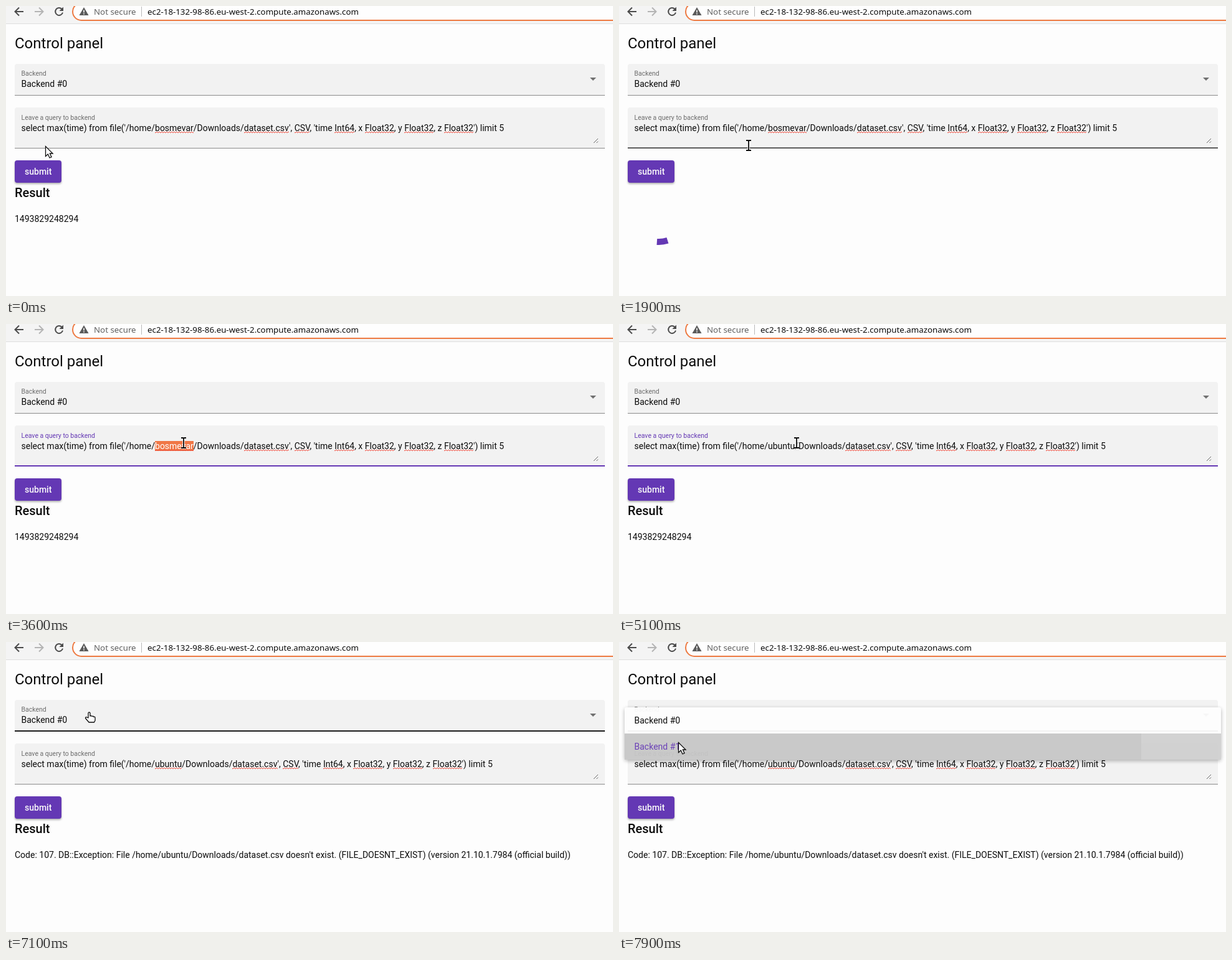
An HTML page that plays this animation: 974x466 px, repeating every 8 s.

```html
<!DOCTYPE html>
<html lang="en">
<head>
<meta charset="utf-8">
<title>Control panel</title>
<style>
  html, body { margin: 0; width: 100%; height: 100%; overflow: hidden; background: #fdfdfd; }
  svg { display: block; }
  text, .query { font: 14px Roboto, sans-serif; fill: #0c0c0c; color: #0c0c0c; white-space: pre; }
  .query { line-height: 16px; }
  .url { font: 13.3px "Noto Sans", sans-serif; }
  .title { font-size: 24px; }
  .label { font-size: 10.5px; fill: #6c6c6c; }
  .strong { font-weight: 500; }
  .field { fill: #f2f2f2; }
  .line { fill: #8a8a8a; }
  .icon { fill: none; stroke: #4a4a4a; stroke-width: 2; }
  .typo {
    background:
      repeating-linear-gradient(90deg, #ee4a3c 0 2px, transparent 2px 4px) 0 100% / 100% 1px no-repeat,
      repeating-linear-gradient(90deg, transparent 0 2px, #ee4a3c 2px 4px) 0 calc(100% - 1px) / 100% 1px no-repeat;
  }
  .selected { background-color: #f07746; color: #fff; }
  #button { fill: #6438b4; filter: drop-shadow(0 2px 1.5px rgba(0, 0, 0, .3)); }
  #button.pressed { filter: drop-shadow(0 4px 4px rgba(0, 0, 0, .35)); }
  #sheet { fill: #fefefe; filter: drop-shadow(0 2px 3px rgba(0, 0, 0, .3)); }
</style>
</head>
<body>
<svg width="974" height="466" viewBox="0 0 974 466">
  <rect width="974" height="28" fill="#f4f4f4"/>
  <rect y="28" width="974" height="1" fill="#dedede"/>
  <rect x="107" y="-5" width="920" height="28" rx="14" fill="#fefefe" stroke="#ee7a42" stroke-width="2"/>
  <path class="icon" d="M28 9H15M21 2.5L14.5 9L21 15.5"/>
  <path class="icon" style="stroke:#b4b4b4" d="M46 9H59M53 2.5L59.5 9L53 15.5"/>
  <path class="icon" d="M89.5 4.7A6 6 0 1 0 91 10.5"/>
  <path fill="#4a4a4a" d="M92 1.5V8H85.5z"/>
  <path fill="#5a5a5a" d="M125 2L132.5 15H117.500z"/>
  <path stroke="#fefefe" stroke-width="1.6" d="M125 6.500V10.500M125 11.800V13.400"/>
  <text class="url" x="141" y="13.500" style="fill:#606060">Not secure</text>
  <rect x="217" y="1" width="1" height="16" fill="#b9b9b9"/>
  <text class="url" x="227" y="13.500">ec2-18-132-98-86.eu-west-2.compute.amazonaws.com</text>

  <text class="title" x="14" y="68">Control panel</text>

  <path class="field" d="M14 143V97q0-4 4-4H957q4 0 4 4V143z"/>
  <rect class="line" x="14" y="143" width="947" height="1"/>
  <rect id="selectLine" x="14" y="142" width="947" height="2" fill="#1c1c1c"/>
  <text class="label" x="24.500" y="112">Backend</text>
  <text x="24.500" y="130">Backend #0</text>
  <path fill="#707070" d="M937 115H947L942 120z"/>

  <path class="field" d="M14 228V167q0-4 4-4H957q4 0 4 4V228z"/>
  <rect class="line" x="14" y="228" width="947" height="1"/>
  <rect id="queryLine" x="14" y="227" width="947" height="2"/>
  <text id="queryLabel" class="label" x="24.500" y="183">Leave a query to backend</text>
  <foreignObject x="24.500" y="188" width="920" height="18">
    <div class="query">select max(time) from file('/home/<span id="user"></span>/Downloads/<span class="typo">dataset.csv</span>', <span class="typo">CSV</span>, 'time <span class="typo">Int64</span>, x <span class="typo">Float32</span>, y <span class="typo">Float32</span>, z <span class="typo">Float32</span>') limit 5</div>
  </foreignObject>
  <path stroke="#666" d="M943 220L950 213M947.500 220L950 217.500"/>

  <rect id="button" x="14" y="248" width="75" height="36" rx="4"/>
  <text class="strong" x="30" y="271" style="fill:#fafafa">submit</text>

  <g id="result">
    <text class="strong" x="14" y="307" style="font-size:20px">Result</text>
    <text id="output" x="14" y="347"></text>
  </g>
  <circle id="spinner" cx="64" cy="334" r="45" pathLength="100" fill="none" stroke="#6438b4" stroke-width="10"/>

  <g id="menu">
    <rect id="sheet" x="9" y="105" width="957" height="84" rx="3"/>
    <rect id="hover" x="9" y="147" width="957" height="42" fill="#d0d0d0"/>
    <rect id="ripple" x="9" y="147" height="42" fill="#000" opacity=".045"/>
    <text id="option0" x="24.500" y="131">Backend #0</text>
    <text id="option1" x="24.500" y="173">Backend #1</text>
  </g>

  <g id="pointer">
    <path id="arrow" fill="#fefefe" stroke="#0a0a0a" stroke-width="1.300" d="M.5 .5V16.500L4.300 13L7 19L10 17.700L7.400 12H12z"/>
    <g id="beam" fill="none">
      <path stroke="#fefefe" stroke-width="3.500" d="M-4 -8H4M-4 8H4M0 -8V8"/>
      <path stroke="#0a0a0a" stroke-width="1.800" d="M-4 -8H-1L0 -7L1 -8H4M-4 8H-1L0 7L1 8H4M0 -7V7"/>
    </g>
    <path id="hand" fill="#fefefe" stroke="#0a0a0a" stroke-width="1.300" stroke-linejoin="round"
      d="M-2 9V1.500Q-2 0 -.5 0T1 1.500V6Q3 4.800 4 6.500Q6 5.500 6.500 7.300Q9 6.500 9 9V13L7.500 16H-1L-6.500 9.500Q-6.500 7 -4 8z"/>
  </g>
</svg>
<script>
const el = Object.fromEntries([...document.querySelectorAll('[id]')].map(e => [e.id, e]));
const LOOP = 8000, STEP = 100;
const PURPLE = '#6438b4', DARK = '#0c0c0c';

// time, x, y, shape shown from that time on
const path = [
  [0, 63, 225, 'arrow'], [300, 68, 243, 'arrow'], [700, 81, 264, 'arrow'], [900, 83, 267, 'arrow'],
  [1400, 83, 267, 'arrow'], [1800, 180, 222, 'beam'], [2000, 235, 226, 'beam'], [2100, 255, 236, 'arrow'],
  [2500, 299, 277, 'arrow'], [2700, 298, 275, 'arrow'], [2900, 289, 222, 'beam'], [3200, 283, 191, 'beam'],
  [3500, 284, 192, 'beam'], [3600, 285, 191, 'beam'], [5100, 285, 191, 'beam'], [5400, 170, 228, 'arrow'],
  [5700, 74, 265, 'arrow'], [6100, 74, 266, 'arrow'], [6500, 100, 222, 'beam'], [6800, 125, 193, 'beam'],
  [6900, 130, 140, 'hand'], [7100, 134, 113, 'hand'], [7400, 126, 118, 'hand'], [7600, 112, 138, 'arrow'],
  [7800, 96, 160, 'arrow'], [7900, 95, 161, 'arrow'], [LOOP, 95, 161, 'arrow']
];
const typed = [[0, 'bosmevar'], [4000, 'u'], [4100, 'ub'], [4200, 'ubu'], [4400, 'ubunt'], [4600, 'ubuntu']];

const within = (t, from, to) => t >= from && t < to;
const fade = (t, from, to) => within(t, from, to) ? Math.min(1, (t - from + 50) / 250) : 0;
const show = (e, on) => { e.style.display = on ? '' : 'none'; };

// cubic-bezier(.35, 0, .25, 1)
function ease(x) {
  let lo = 0, hi = 1;
  for (let i = 0; i < 20; i++) {
    const s = (lo + hi) / 2;
    const bx = 3 * s * (1 - s) ** 2 * .35 + 3 * s * s * (1 - s) * .25 + s ** 3;
    if (bx < x) lo = s; else hi = s;
  }
  return 3 * lo * lo - 2 * lo ** 3;
}

function drawSpinner(age) {
  const phase = Math.floor(age / 500), turn = phase >> 1, e = ease(age % 500 / 500);
  const part = phase % 2 ? .8 - .75 * e : .05 + .75 * e;
  const start = phase % 2 ? -(72.5 + 89 * turn + 360 * part) : -90 * turn;
  el.spinner.setAttribute('stroke-dasharray', `${part * 100} 100`);
  el.spinner.setAttribute('transform', `rotate(${start + age * .18} 64 334)`);
}

function drawPointer(t) {
  const i = path.findIndex(k => k[0] > t);
  const [t0, x0, y0, shape] = path[i - 1], [t1, x1, y1] = path[i];
  const p = (t - t0) / (t1 - t0);
  const x = Math.round(x0 + (x1 - x0) * p), y = Math.round(y0 + (y1 - y0) * p);
  el.pointer.setAttribute('transform', `translate(${x} ${y})`);
  for (const id of ['arrow', 'beam', 'hand']) show(el[id], id === shape);
}

function drawQuery(t) {
  const focused = within(t, 3300, 5800);
  el.user.textContent = typed.filter(k => k[0] <= t).pop()[1];
  el.user.className = (within(t, 4000, 5800) ? '' : 'typo') + (within(t, 3500, 4000) ? ' selected' : '');
  el.queryLabel.style.fill = focused ? PURPLE : '';
  el.queryLine.style.fill = focused ? PURPLE : '#1c1c1c';
  el.queryLine.style.opacity = focused ? 1 :
    Math.max(fade(t, 1800, 2100), fade(t, 2900, 3300), fade(t, 6500, 6900));
}

function drawMenu(t) {
  show(el.menu, t >= 7500);
  el.menu.style.opacity = t < 7600 ? .6 : t < 7900 ? 1 : .95;
  show(el.hover, t >= 7700);
  show(el.ripple, t >= 7800);
  el.ripple.setAttribute('width', t < 7900 ? 430 : 829);
  el.option0.style.fill = t < 7900 ? PURPLE : DARK;
  el.option1.style.fill = t < 7900 ? DARK : PURPLE;
}

function draw(t) {
  const first = within(t, 900, 2100), second = within(t, 6000, 6500);
  show(el.spinner, first || second);
  show(el.result, !(first || second));
  if (first) drawSpinner(Math.max(0, t - 975));
  if (second) drawSpinner(t - 6000);
  el.output.textContent = t < 6500 ? '1493829248294' :
    "Code: 107. DB::Exception: File /home/ubuntu/Downloads/dataset.csv doesn't exist. (FILE_DOESNT_EXIST) (version 21.10.1.7984 (official build))";
  el.button.setAttribute('class', within(t, 700, 1000) || within(t, 5800, 6000) ? 'pressed' : '');
  el.selectLine.style.opacity = fade(t, 6900, LOOP);
  drawQuery(t);
  drawMenu(t);
  drawPointer(t);
}

const begin = performance.now();
function frame() {
  const t = (performance.now() - begin) % LOOP;
  draw(Math.floor(t / STEP) * STEP);
  requestAnimationFrame(frame);
}
frame();
</script>
</body>
</html>
```
